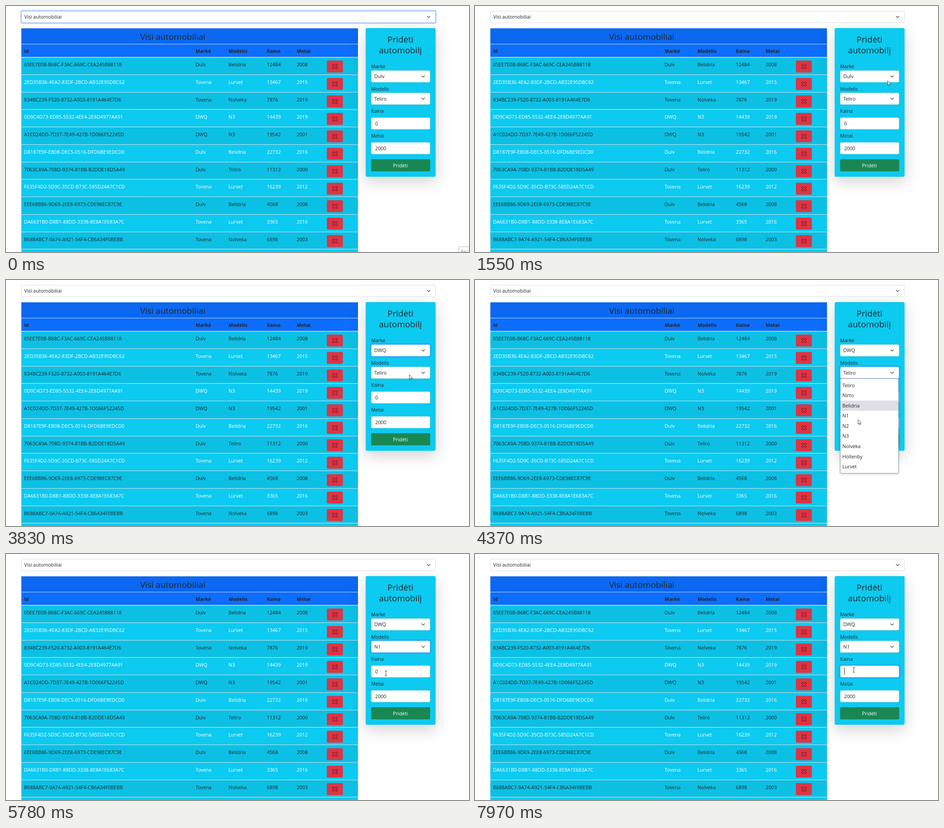
These frames come from a looping animation (1026x546 px, 8000 ms). An HTML page:

```html
<!DOCTYPE html>
<html lang="lt">
<head>
<meta charset="utf-8">
<title>Visi automobiliai</title>
<style>
html, body { margin: 0; width: 100%; height: 100%; overflow: hidden; background: #fff; }
svg { display: block; font: 10.8px "Open Sans", "Noto Sans", sans-serif; }
text { white-space: pre; }
.big { font-size: 18.85px; text-anchor: middle; }
.bold { font-weight: 700; }
.card { filter: drop-shadow(0 11px 17px rgba(0, 0, 0, .175)); }
</style>
</head>
<body>
<svg width="1026" height="546" viewBox="0 0 1026 546"><g id="page"></g><g id="live"></g></svg>
<script>
const LOOP = 8000, INK = '#212529', CYAN = '#0dcaf0';
const BRANDS = ['Dulv', 'DWQ', 'Tovena'];
const MODELS = ['Teliro', 'Nirto', 'Belidria', 'N1', 'N2', 'N3', 'Nolveka', 'Hollenby', 'Lurvet'];
// id, brand, model, price, year
const CARS = `05EE7E0B-B68C-F3AC-669C-CEA245B88118 0 2 12484 2008
2ED35B36-4EA2-83DF-2BCD-AB32E95DBC62 2 8 13467 2015
834BC239-F520-8732-A003-8191A464E7D6 2 6 7876 2019
0D9C4D73-ED85-5532-4EE4-2E8D4977AA91 1 5 14439 2019
A1C024DD-7D37-7E49-427B-1D066F52245D 1 5 19542 2001
D8187E9F-EB08-DEC5-0516-DFD6BE9EDCD0 0 2 22732 2016
7063CA9A-708D-9374-81BB-B2DDE18D5A49 0 0 11312 2000
F635F4D2-5D9C-35CD-B73C-585D24A7C1CD 2 8 16239 2012
EEE6BB86-9D69-2EE8-6973-CDE98EC87C9E 0 2 4568 2008
DA6631B0-D8B1-88DD-3338-8E8A1E683A7C 2 8 3365 2016
B688ABC7-9A74-A921-54F4-CB6A34F0BEBB 2 6 6898 2003`.split('\n').map(line => line.split(' '));
const COLUMNS = [40, 420, 493, 578, 644];

const rect = (x, y, w, h, fill, more = '') =>
  `<rect x="${x}" y="${y}" width="${w}" height="${h}" fill="${fill}" ${more}/>`;
const text = (x, y, s, fill = INK, more = '') => `<text x="${x}" y="${y}" fill="${fill}" ${more}>${s}</text>`;
const path = (x, y, d, stroke, width, fill = 'none') =>
  `<path transform="translate(${x} ${y})" d="${d}" stroke="${stroke}" stroke-width="${width}" fill="${fill}"/>`;
const chevron = (x, y) => path(x, y, 'M-3.5-1.8L0 1.7 3.5-1.8', '#343a40', 1.3);
const clamp = v => Math.max(0, Math.min(1, v));

function table() {
  let out = rect(34, 49.5, 746, 35, '#0c68f0') + rect(34, 85, 746, 29, '#0d6efd')
    + rect(34, 84, 746, 1, '#c5d9f5') + text(369.5, 75, 'Visi automobiliai', INK, 'class="big"');
  ['Id', 'Markė', 'Modelis', 'Kaina', 'Metai'].forEach((s, i) => out += text(COLUMNS[i], 104, s, INK, 'class="bold"'));
  for (let r = 0; r < 12; r++) {
    const y = 114 + r * 38.75, odd = r % 2;
    out += rect(34, y, 746, 39, odd ? CYAN : '#0cc0e4') + rect(34, Math.round(y) - 1, 746, r ? 1 : 1.5, '#dee2e6');
    if (!CARS[r]) continue;
    const [id, brand, model, price, year] = CARS[r];
    [id, BRANDS[brand], MODELS[model], price, year].forEach((s, i) =>
      out += text(COLUMNS[i], y + 20, s, odd ? '#fff' : INK));
    out += rect(711, y + 7, 35.5, 26.5, '#dc3545', 'rx="2.8"')
      + path(728.8, y + 20.3, 'M-3.2-5.3L0-2 3.2-5.3 5.6-3 2.3 0 5.6 3 3.2 5.3 0 2-3.2 5.3-5.6 3-2.3 0-5.6-3Z', '#3c0a10', .9);
  }
  return out;
}

function card() {
  let out = rect(797, 49, 155, 330, CYAN, 'rx="3" class="card"')
    + text(874, 80.8, 'Pridėti', INK, 'class="big"') + text(874, 104.5, 'automobilį', INK, 'class="big"')
    + rect(809, 340, 131, 27, '#198754', 'rx="2.8"')
    + text(874, 357.7, 'Pridėti', '#fff', 'text-anchor="middle"');
  [['Markė', 138], ['Modelis', 187.5], ['Kaina', 237.3], ['Metai', 292.3]].forEach(([s, y]) => out += text(809, y, s));
  return out;
}

function field(x, y, w, focus, value, pad, isSelect) {
  let out = '';
  if (focus) out = rect(x - 2.5, y - 2.5, w + 5, 31.5, '#0d6efd', `rx="5" opacity="${.25 * focus}"`);
  out += rect(x + .4, y + .4, w - .8, 25.7, '#fff', 'rx="2.8" stroke="#ced4da" stroke-width=".8"');
  if (focus) out += rect(x + .4, y + .4, w - .8, 25.7, 'none', `rx="2.8" stroke="#86b7fe" stroke-width=".9" opacity="${focus}"`);
  return out + text(x + pad, y + 17.2, value) + (isSelect ? chevron(x + w - 15.5, y + 13.2) : '');
}

function dropdown(y, items, active) {
  let out = rect(809.5, y, 129, items.length * 22.55 + 7, '#fff',
    'rx="2" stroke="#8f9aa3" stroke-width=".9" style="filter:drop-shadow(0 1px 2px #0004)"');
  items.forEach((s, i) => {
    const top = y + 3.5 + i * 22.55;
    if (i === active) out += rect(810, top, 128, 22.55, '#e0dfe6');
    out += text(814, top + 15.2, s);
  });
  return out;
}

// time, x, y of the pointer's hot spot
const TRACK = [
  [70, 1030, 556], [400, 975, 320], [680, 936, 199], [820, 935, 197], [1200, 922, 178], [1550, 914, 165.5],
  [1690, 912, 162], [1830, 912, 162], [2160, 890, 161], [2350, 890, 161], [2490, 860.5, 191.5], [2750, 858, 203],
  [3430, 858, 203], [3830, 893.5, 210], [4030, 897, 207], [4120, 897, 207], [4300, 851, 298], [4370, 848.5, 309.5],
  [4840, 848.5, 309.5], [5000, 843, 309], [5170, 852, 319], [5320, 852, 319], [5430, 854.5, 319.5],
  [5580, 854.5, 319.5], [5780, 842, 265], [6040, 839.5, 257], [LOOP, 839.5, 257]];

function pointerAt(t) {
  const i = Math.max(1, TRACK.findIndex(p => p[0] >= t));
  const [a, b] = [TRACK[i - 1], TRACK[i]], k = clamp((t - a[0]) / (b[0] - a[0]));
  return [a[1] + (b[1] - a[1]) * k, a[2] + (b[2] - a[2]) * k];
}

function pointer(t) {
  if (t < 70) return '';
  const [x, y] = pointerAt(t);
  const overInput = t > 4735 && (y > 302 || y > 247 && y < 274);
  return overInput
    ? path(x, y, 'M-2.6-5.5H-1Q0-5.5 0-4.5Q0-5.5 1-5.5H2.6M0-4.5V4.5M-2.6 5.5H-1Q0 5.5 0 4.5Q0 5.5 1 5.5H2.6', '#222', .9)
    : path(x, y, 'M.4.4V10.6L2.7 8.5 4.2 12 5.8 11.3 4.3 7.9H7.5Z', '#222', .8, '#fff');
}

function live(t) {
  const between = (a, b) => t >= a && t < b;
  const focus = (on, off) => clamp((t - on) / 150) - clamp((t - off) / 150);
  let out = field(34, 11, 918, focus(-200, 70), 'Visi automobiliai', 6.5, true)
    + field(809, 143, 131, focus(1830, 4030), BRANDS[t < 2890 ? 0 : 1], 7, true)
    + field(809, 192.5, 131, focus(4030, 6390), MODELS[t < 4700 ? 0 : 3], 7, true)
    + field(809, 247.5, 131, focus(6390, LOOP + 200), t < 7240 ? '0' : '', 9)
    + field(809, 302.5, 131, 0, '2000', 9);
  if (between(1900, 2890)) out += dropdown(169.3, BRANDS, t < 2560 ? 0 : 1);
  if (between(4100, 4700)) out += dropdown(219, MODELS, t < 4300 ? 0 : t < 4370 ? 1 : t < 4440 ? 2 : 3);
  if (between(6390, 6910)) out += rect(824, 252, 1, 16, INK);
  if (between(7240, 7450) || t >= 7970) out += rect(818, 252, 1, 16, INK);
  if (t < 70) out += rect(1003.5, 534.5, 40, 30, '#fff', 'stroke="#bbb"') + text(1008, 548, 'Record', '#888', 'font-size="9"');
  return out + pointer(t);
}

const layer = document.getElementById('live');
document.getElementById('page').innerHTML = table() + card();
const start = performance.now();
function draw() {
  layer.innerHTML = live((performance.now() - start) % LOOP);
  requestAnimationFrame(draw);
}
draw();
</script>
</body>
</html>
```
